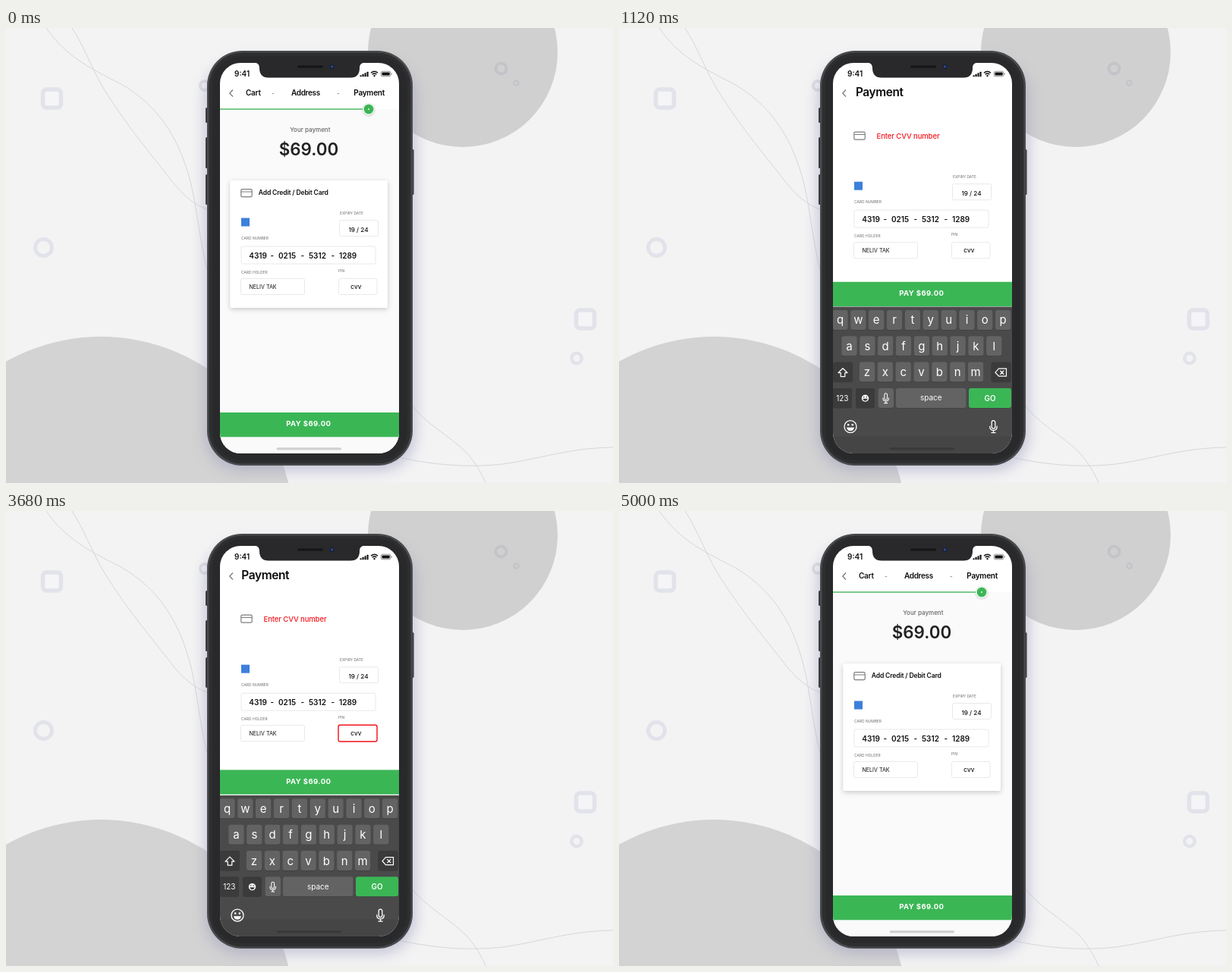
Animation, 800 px wide and 600 px high, one loop 6460 ms. Source, as an HTML page:

```html
<!DOCTYPE html>
<html lang="en">
<head>
<meta charset="utf-8">
<title>Payment screen</title>
<style>
  html, body { margin: 0; width: 100%; height: 100%; overflow: hidden; background: #f3f3f4; }
  svg { display: block; width: 100vw; height: 100vh; }
  text { font-family: Inter, Roboto, sans-serif; white-space: pre; }
</style>
</head>
<body>
<svg id="stage" viewBox="0 0 800 600"></svg>
<script>
const LOOP = 6460;
const GREEN = '#3bb655', RED = '#f5141c';

// Markup helpers
const rect = (x, y, w, h, r, fill, more = '') =>
  `<rect x="${x}" y="${y}" width="${w}" height="${h}" rx="${r}" fill="${fill}" ${more}/>`;
const disc = (x, y, r, fill, more = '') =>
  `<circle cx="${x}" cy="${y}" r="${r}" fill="${fill}" ${more}/>`;
const path = (d, color, w = 1, more = '') =>
  `<path d="${d}" fill="none" stroke="${color}" stroke-width="${w}" ${more}/>`;
const text = (x, y, size, weight, str, fill = '#111', more = '') =>
  `<text x="${x}" y="${y}" font-size="${size}" font-weight="${weight}" fill="${fill}" ${more}>${str}</text>`;
const group = (id, ...parts) => `<g id="${id}">${parts.join('')}</g>`;
const MID = 'text-anchor="middle"';
const TIGHT = 'letter-spacing="-.025em"';

const ring = (x, y, r, w, color) => disc(x, y, r, 'none', `stroke="${color}" stroke-width="${w}"`);
const frame = (x, y) => rect(x - 12, y - 12, 24, 24, 5, '#f5f5f7', 'stroke="#e2e3ea" stroke-width="5.5"');
const field = (x, y, w, h) => rect(x, y, w, h, 2, '#fff', 'stroke="#e9e9eb" stroke-width="1"');
const label = (x, y, str) => text(x, y, 4.9, 400, str, '#6d6d6d');

function backdrop() {
  return [
    rect(0, 0, 800, 600, 0, '#f3f3f4'),
    disc(602, 32, 125, '#d0d0d0'),
    disc(125, 662, 255, '#d3d3d3'),
    path('M53 0C78 36 108 52 150 73C205 104 232 152 246 215C254 255 258 300 270 335', '#d6d7db'),
    path('M87 0C103 24 112 52 130 82C160 130 190 165 214 196C232 220 248 234 270 241', '#d6d7db'),
    path('M530 492C552 522 585 538 606 559C619 573 627 588 633 602', '#d6d7db'),
    path('M505 563C560 577 610 580 655 575C705 568 740 554 800 553', '#d6d7db'),
    frame(60.5, 93), frame(763.5, 384),
    ring(49.5, 289.5, 11, 5, '#e2e3ea'), ring(752, 435.5, 6.7, 4.5, '#e2e3ea'),
    ring(652.5, 53.5, 7, 4, '#c3c4c9'), ring(672.5, 72.5, 3.2, 2.4, '#c3c4c9'),
    ring(262, 76, 6, 4, '#dcdde4')
  ].join('');
}

function body() {
  const side = (x, y, h) => rect(x, y, 4, h, 1.5, '#3b3b3e');
  return [
    rect(262, 42, 278, 542, 48, '#9897bb', 'opacity=".5" filter="url(#blur)"'),
    side(263, 105, 20), side(263, 144, 41), side(263, 193, 40), side(533.5, 160, 60),
    rect(265, 30, 271, 547, 46, '#48494b'),
    rect(267.5, 32.5, 266, 542, 44, '#2d2e30'),
    rect(272, 37, 257, 533, 38, '#29292b')
  ].join('');
}

function notch() {
  return `<path d="M327 45.5C332 46 334 48.5 334 53C334 61 338 65.500 346 65.500H454
    C462 65.500 466 61 466 53C466 48.500 468 46 473 45.500Z" fill="#29292b"/>` +
    rect(384, 49.5, 34, 3, 1.5, '#151517') +
    disc(429.500, 51, 3, '#17213c') + disc(429.500, 51, 1.4, '#2f569f');
}

function statusBar() {
  const bars = [0, 1, 2, 3].map(i => rect(466.5 + i * 3, 62.3 - i * 1.5, 2.1, 2 + i * 1.5, .5, '#111'));
  return text(301, 64.4, 10, 600, '9:41') + bars.join('') +
    path('M481 59.300Q485.500 55.300 490 59.300M482.700 61.300Q485.500 58.800 488.300 61.300', '#111', 1.5) +
    disc(485.5, 63, 1.2, '#111') +
    rect(494.3, 57.2, 12.6, 6.6, 1.8, 'none', 'stroke="#777" stroke-width=".8"') +
    rect(495.5, 58.4, 10.2, 4.2, .8, '#111') + rect(507.7, 59.4, 1, 2.2, .4, '#777');
}

function header() {
  return [
    path('M299 81.500L294.800 86L299 90.500', '#777', 1.2),
    group('cart', text(316, 89.400, 10, 600, 'Cart', '#111', TIGHT)),
    group('dashes', text(350, 88.5, 8, 500, '-', '#777'), text(436, 88.5, 8, 500, '-', '#777')),
    group('address', text(376, 89.4, 10, 600, 'Address', '#111', 'letter-spacing="-.035em"')),
    group('title', text(0, 0, 10, 600, 'Payment', '#0a0a0a', TIGHT)),
    '<line id="track" y1="107" x2="478" y2="107" stroke="#4fbb66" stroke-width="1.4"/>',
    group('knob', disc(0, .8, 9, '#000', 'opacity=".1"'), disc(0, 0, 8.2, '#e6f3e9'),
      disc(0, 0, 6.3, GREEN), disc(0, 0, .9, '#fff'))
  ].join('');
}

function card() {
  const digits = ['4319', '0215', '5312', '1289'];
  const xs = [320.3, 359, 399, 439];
  const number = digits.map((d, i) => text(xs[i], 303.7, 10, 600, d) +
    (i < 3 ? text(348.5 + i * 40, 303.5, 10, 600, '-') : ''));
  return group('panel', rect(295.5, 201, 207.500, 168, 2, '#fff', 'filter="url(#lift)"')) +
    group('fields',
      rect(310, 250.5, 11, 11, 0, '#3d7fdb'),
      label(440, 245.6, 'EXPIRY DATE'), field(439.5, 253.5, 51, 21),
      text(464.5, 268.600, 8.2, 500, '19 / 24', '#111', MID),
      label(310, 279, 'CARD NUMBER'), field(310, 288, 177, 23), ...number,
      label(310, 324, 'CARD HOLDER'), field(309.500, 330.5, 84, 21),
      text(320.5, 343.900, 7.1, 400, 'NELIV TAK'),
      label(438, 322, 'PIN'), field(438.5, 330.5, 50.5, 21),
      text(461.3, 343.7, 6.4, 600, 'CVV', '#111', MID),
      path('M489 347.500V349.500Q489 351.800 486.700 351.800H440.300Q438 351.800 438 349.500V332.300' +
        'Q438 330 440.300 330H486.700Q489 330 489 332.300Z', RED, 1.4, 'id="alert" pathLength="1"')) +
    group('caption',
      rect(309.8, 212.7, 14.4, 10, 1.6, 'none', 'stroke="#7d7d7d" stroke-width="1.2"') +
      path('M310 216H324', '#7d7d7d', 1.2),
      group('addCard', text(332.8, 220.400, 8.6, 600, 'Add Credit / Debit Card', '#111', 'letter-spacing="-.02em"'))) +
    group('error', text(339.5, 145.700, 9.5, 500, 'Enter CVV number', RED, 'letter-spacing="-.01em"'));
}

function smile(x, y, r, ink, paper) {
  const s = r / 8;
  return `<g transform="translate(${x} ${y}) scale(${s})">` +
    disc(0, 0, 8, paper, `stroke="${ink}" stroke-width="1.3"`) +
    disc(-2.8, -2.5, 1.3, ink) + disc(2.8, -2.5, 1.3, ink) +
    `<path d="M-5 1H5Q4 5.500 0 5.500T-5 1Z" fill="${ink}"/></g>`;
}

const mic = (x, y, s) => `<g transform="translate(${x} ${y}) scale(${s})">` +
  rect(-2.3, -8, 4.6, 10.5, 2.3, 'none', 'stroke="#fff" stroke-width="1.3"') +
  path('M-4.700 -1V0Q-4.700 4.800 0 4.800T4.700 0V-1M0 5V8M-3 8H3', '#fff', 1.3) + '</g>';

function keys() {
  const key = (x, y, w, fill = '#636363') =>
    rect(x, y - 13, w, 26.4, 3, '#333', 'opacity=".6"') + rect(x, y - 13.300, w, 26, 3, fill);
  const row = (str, x, y) => [...str].map((c, i) => {
    const cx = x + i * 23.85;
    return key(cx - 10.2, y, 20.4) + text(cx, y + 5.2, 15, 400, c, '#fff', MID);
  }).join('');
  const dark = '#3b3b3b';
  return [
    row('qwertyuiop', 291.5, 384), row('asdfghjkl', 303.5, 418.3), row('zxcvbnm', 327, 452.7),
    key(282, 452.7, 26, dark), key(490.5, 452.7, 26, dark),
    path('M295 447.500L301 453.500H297.800V458.500H292.200V453.500H289Z', '#fff', 1.2, 'stroke-linejoin="round"'),
    path('M500.500 448H510.500V458H500.500L496 453ZM502.300 450.500L507.300 455.500M507.300 450.500L502.300 455.500', '#fff', 1.2),
    key(282, 487, 25, dark), key(312, 487, 25, dark), key(341.5, 487, 20.5),
    key(365, 487, 92.500), key(461, 487, 56, GREEN),
    text(294.3, 490.4, 10, 400, '123', '#fff', MID),
    smile(324.5, 487, 5, '#3b3b3b', '#fff'), mic(351.7, 487, .8),
    text(411.300, 490, 10, 400, 'space', '#fff', MID),
    text(489, 490.4, 9.800, 600, 'GO', '#fff', MID),
    smile(305, 524.5, 8, '#fff', 'none'), mic(493.5, 524.5, 1)
  ].join('');
}

const stage = document.getElementById('stage');
stage.innerHTML = `<defs>
  <clipPath id="screen">${rect(282, 46, 236, 515, 27, '#fff')}</clipPath>
  <filter id="blur" x="-20%" y="-20%" width="140%" height="140%"><feGaussianBlur stdDeviation="9"/></filter>
  <filter id="lift" x="-20%" y="-20%" width="140%" height="140%">
    <feDropShadow dx="0" dy="2" stdDeviation="3" flood-opacity=".2"/></filter>
  </defs>` + backdrop() + body() +
  '<g clip-path="url(#screen)">' +
  rect(282, 46, 236, 515, 0, '#fff') +
  rect(282, 107, 236, 454, 0, '#fafafa', 'id="tint"') +
  statusBar() + header() +
  group('amount', text(400.8, 136.700, 8, 500, 'Your payment', '#666', MID),
    text(399, 168.300, 22.4, 600, '$69.00', '#222', MID)) +
  card() +
  group('pay', rect(282, 507, 236, 32.3, 0, GREEN),
    text(398.8, 525.4, 9.5, 700, 'PAY $69.00', '#fff', MID + ' letter-spacing=".4"')) +
  group('board', rect(282, 366.300, 236, 400, 0, '#4a4a4a')) +
  rect(282, 538.500, 236, 23, 0, '#000', 'id="shade"') +
  rect(356.5, 553.3, 85.500, 3.2, 1.6, '#000', 'opacity=".17"') +
  group('keys', keys()) +
  '</g>' + notch();

const el = {};
stage.querySelectorAll('[id]').forEach(n => el[n.id] = n);

// Cubic Bezier (.42, 0, .2, 1), solved by bisection
function ease(u) {
  if (u <= 0) return 0;
  if (u >= 1) return 1;
  let lo = 0, hi = 1;
  for (let i = 0; i < 22; i++) {
    const s = (lo + hi) / 2, r = 1 - s;
    if (3 * r * r * s * .42 + 3 * r * s * s * .2 + s * s * s < u) lo = s; else hi = s;
  }
  return lo * lo * (3 - 2 * lo);
}
const ramp = (t, a, b) => Math.min(1, Math.max(0, (t - a) / (b - a)));
const mix = (a, b, p) => a + (b - a) * p;

// 0 -> 1 on the way in, 1 -> 0 on the way back
const move = (t, a, b, c, d) => ease(ramp(t, a, b)) - ease(ramp(t, c, d));
const fade = (t, a, b, c, d) => ramp(t, a, b) - ramp(t, c, d);

const shift = (n, y) => n.setAttribute('transform', `translate(0 ${y.toFixed(2)})`);
const show = (n, v) => n.setAttribute('opacity', v.toFixed(3));

function draw(t) {
  const sheet = move(t, 190, 1230, 3526, 4695);
  shift(el.pay, -173.3 * sheet);
  shift(el.board, 195 * (1 - sheet));
  shift(el.keys, 195 * (1 - sheet));
  show(el.shade, .07 * sheet);

  const rise = move(t, 116, 1116, 3820, 4880);
  shift(el.fields, -47.8 * rise);
  shift(el.panel, -47.8 * rise);
  shift(el.caption, -75.5 * rise);

  const slide = move(t, 209, 1269, 3835, 4920);
  const grow = mix(1, 1.55, move(t, 317, 1267, 3850, 4920));
  el.title.setAttribute('transform',
    `translate(${mix(458.3, 310.2, slide).toFixed(2)} ${mix(88.7, 90.1, slide).toFixed(2)}) scale(${grow.toFixed(4)})`);

  const line = move(t, 20, 620, 3680, 4425);
  el.track.setAttribute('x1', mix(282, 478, line).toFixed(2));
  const knob = 1 - move(t, 20, 700, 4100, 4700);
  el.knob.setAttribute('transform', `translate(478 107) scale(${knob.toFixed(3)})`);

  show(el.cart, 1 - fade(t, 200, 1080, 4250, 4850));
  show(el.dashes, 1 - fade(t, 100, 860, 4250, 4850));
  show(el.address, 1 - fade(t, 60, 440, 4450, 4960));
  show(el.amount, 1 - fade(t, 40, 440, 4250, 4800));
  show(el.panel, 1 - fade(t, 40, 600, 4200, 4850));
  show(el.tint, 1 - fade(t, 40, 600, 4200, 4850));
  show(el.addCard, 1 - fade(t, 200, 700, 4400, 4960));
  show(el.error, fade(t, 520, 920, 3930, 4370));

  const trace = fade(t, 1800, 2120, 3690, 4020);
  el.alert.setAttribute('stroke-dasharray', `${trace.toFixed(4)} 2`);
  show(el.alert, trace > 0 ? 1 : 0);
}

const start = performance.now();
function tick() {
  draw((performance.now() - start) % LOOP);
  requestAnimationFrame(tick);
}
tick();
</script>
</body>
</html>
```
